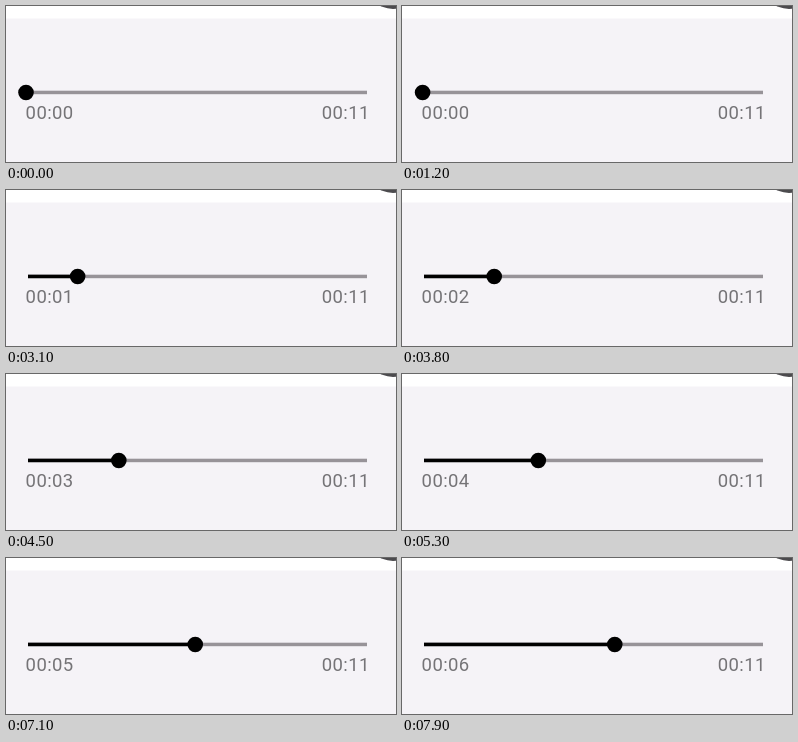
Recreate the animation shown at these times as an HTML page. Size 390 px wide and 156 px high, loop 8000 ms.

```html
<!DOCTYPE html>
<html lang="en">
<head>
<meta charset="utf-8">
<title>Audio progress</title>
<style>
  html, body { margin: 0; width: 100%; height: 100%; overflow: hidden; background: #f5f3f7; }
  svg { display: block; }
  text { font: 18.5px Roboto, sans-serif; letter-spacing: .4px; fill: #757477; }
</style>
</head>
<body>
<svg width="390" height="156" viewBox="0 0 390 156">
  <rect width="390" height="156" fill="#f5f3f7"/>
  <rect width="390" height="12.5" fill="#fff"/>
  <circle cx="387" cy="-25" r="28" fill="#4c4b4e"/>
  <rect x="22" y="84.7" width="339" height="3.5" fill="#979398"/>
  <rect id="played" x="22" y="84.7" width="0" height="3.5"/>
  <circle id="knob" cx="20" cy="86.5" r="7.8"/>
  <text id="elapsed" x="19.6" y="113.2">00:00</text>
  <text x="315.7" y="113.2">00:11</text>
</svg>
<script>
  const LOOP = 8000, STEP = 100, START = 1200;
  const [played, knob, elapsed] = ['played', 'knob', 'elapsed'].map(id => document.getElementById(id));

  function knobX(t) {
    if (t < START) return 20;
    return Math.max(20.6, 54 + 0.0294 * (t - 2500));
  }

  function draw(now) {
    const t = Math.floor(now % LOOP / STEP) * STEP;
    const x = knobX(t);
    const seconds = Math.max(0, Math.floor((t - START) / 1000));
    knob.setAttribute('cx', x);
    played.setAttribute('width', Math.max(0, x - 22));
    elapsed.textContent = '00:' + String(seconds).padStart(2, '0');
  }

  const begin = performance.now();
  function tick() {
    draw(performance.now() - begin);
    requestAnimationFrame(tick);
  }
  tick();
</script>
</body>
</html>
```
